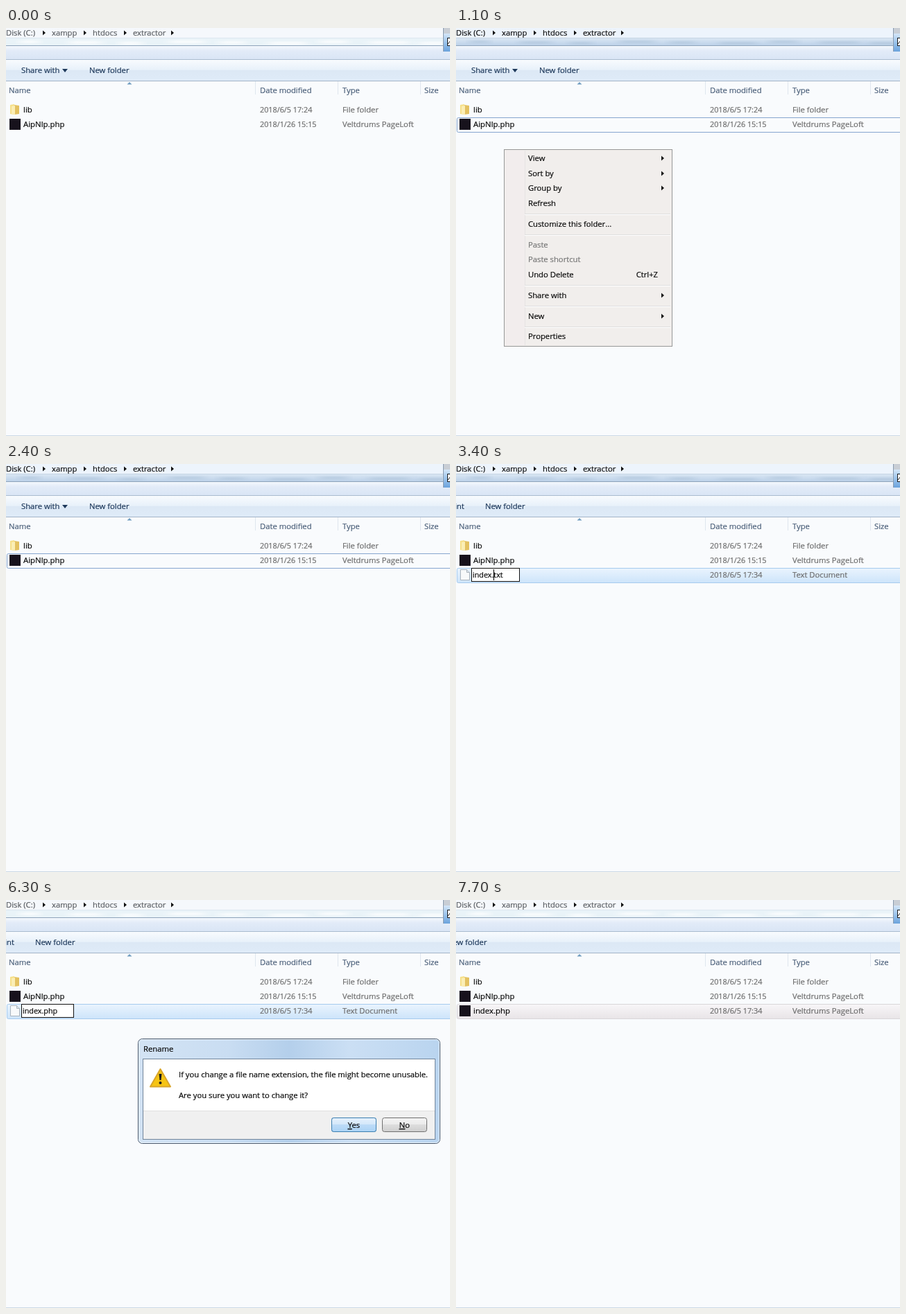
An HTML page that plays this animation: 640x589 px, repeating every 7800 ms.

```html
<!DOCTYPE html>
<html lang="en">
<head>
<meta charset="utf-8">
<title>Renaming a new file</title>
<style>
html, body { margin: 0; width: 100%; height: 100%; overflow: hidden; background: #f9fbfd; }
svg { display: block; width: 640px; height: 589px; }
text {
  --ink: #0c0c0c;
  font: 11.25px "Open Sans", "Noto Sans", sans-serif;
  fill: var(--ink); stroke: var(--ink); stroke-width: .22px; white-space: pre;
}
.date, .edit { font-size: 10.8px; }
.name { font-size: 11.4px; }
.soft { --ink: #6d6d6d; }
.head { --ink: #4c607a; }
.bar { --ink: #1e395b; }
.off { --ink: #777; }
.marked { fill: #fff; stroke: #fff; }
</style>
</head>
<body>
<svg id="stage" viewBox="0 0 640 589" xmlns="http://www.w3.org/2000/svg">
  <defs>
    <linearGradient id="strip" x2="0" y2="1">
      <stop offset="0" stop-color="#f4f8fd"/><stop offset=".35" stop-color="#e2ebf8"/><stop offset="1" stop-color="#d9e5f5"/>
    </linearGradient>
    <linearGradient id="tools" x2="0" y2="1">
      <stop offset="0" stop-color="#f8fbfe"/><stop offset=".48" stop-color="#e8f1fa"/>
      <stop offset=".5" stop-color="#dce8f5"/><stop offset="1" stop-color="#dfebf8"/>
    </linearGradient>
    <linearGradient id="sheen" x2="0" y2="1">
      <stop offset="0" stop-color="#d9e6f3"/><stop offset="1" stop-color="#bdd2e9"/>
    </linearGradient>
    <linearGradient id="picked" x2="0" y2="1">
      <stop offset="0" stop-color="#eaf4fe"/><stop offset="1" stop-color="#cde4fa"/>
    </linearGradient>
    <linearGradient id="idle" x2="0" y2="1">
      <stop offset="0" stop-color="#f8f6f8"/><stop offset="1" stop-color="#e8e4e7"/>
    </linearGradient>
    <linearGradient id="glass">
      <stop offset="0" stop-color="#d3e3f4"/><stop offset=".3" stop-color="#c9ddf2"/><stop offset=".5" stop-color="#b4cfeb"/>
      <stop offset=".7" stop-color="#cbdff4"/><stop offset="1" stop-color="#b9d4ef"/>
    </linearGradient>
    <linearGradient id="button" x2="0" y2="1">
      <stop offset="0" stop-color="#f3f3f3"/><stop offset=".48" stop-color="#ebebeb"/>
      <stop offset=".5" stop-color="#dddddd"/><stop offset="1" stop-color="#cfcfcf"/>
    </linearGradient>
    <linearGradient id="lit" x2="0" y2="1">
      <stop offset="0" stop-color="#e6f1fc"/><stop offset=".48" stop-color="#d3e7fa"/>
      <stop offset=".5" stop-color="#bddbf7"/><stop offset="1" stop-color="#abd3f5"/>
    </linearGradient>
    <linearGradient id="corner" x2="0" y2="1">
      <stop offset="0" stop-color="#d4e6f8"/><stop offset=".5" stop-color="#9cc4ec"/><stop offset="1" stop-color="#6ba3dc"/>
    </linearGradient>
    <filter id="blur" x="-20%" y="-80%" width="140%" height="260%"><feGaussianBlur stdDeviation="7 1.5"/></filter>
    <clipPath id="band"><rect y="15" width="629" height="10"/></clipPath>
  </defs>
</svg>
<script>
const LOOP = 7800, STEP = 100;
const stage = document.getElementById('stage');
const NS = stage.namespaceURI;

function add(tag, attrs, parent = stage, content = '') {
  const node = document.createElementNS(NS, tag);
  for (const key in attrs) node.setAttribute(key, attrs[key]);
  node.textContent = content;
  return parent.appendChild(node);
}
const group = (parent = stage) => add('g', {}, parent);
const rect = (x, y, width, height, fill, parent, more) =>
  add('rect', { x, y, width, height, fill, ...more }, parent);
const frame = (x, y, w, h, fill, stroke, parent, rx = 0) =>
  rect(x + .5, y + .5, w - 1, h - 1, fill, parent, { stroke, rx });
const label = (x, y, content, cls, parent) => add('text', { x, y, class: cls || '' }, parent, content);
const path = (d, fill, parent, more) => add('path', { d, fill, ...more }, parent);
const arrow = (x, y, parent) => path(`M${x} ${y - 3.5}l4 3.5l-4 3.5z`, '#111', parent);
const show = (node, alpha) => {
  node.style.display = alpha > 0 ? '' : 'none';
  node.style.opacity = Number(alpha);
};

// Address bar
rect(0, 0, 640, 589, '#f9fbfd');
const pale = group(), vivid = group();
rect(0, 0, 630, 15, '#f5f8fc', pale);
rect(0, 15, 630, 10, '#e9f3f8', pale);
rect(0, 0, 630, 15, '#edf4fc', vivid);
rect(0, 15, 630, 10, 'url(#sheen)', vivid);
for (const [parent, color] of [[pale, '#ffffff'], [vivid, '#b3c8de']]) {
  const streaks = add('g', { 'clip-path': 'url(#band)' }, parent);
  for (let i = 0; i < 9; i++)
    rect(20 + i * 72, 18 + i % 3, 28 + i * 17 % 30, 4, color, streaks, { filter: 'url(#blur)', opacity: .8 });
}
rect(0, 14, 630, 1, '#dde7f0', pale);
rect(0, 14, 630, 1, '#c6d5e4', vivid);
rect(0, 25, 640, 1, '#8da3ba');
rect(0, 26, 640, 20, 'url(#strip)');
const crumbs = [[0, 'Disk (C:)'], [66, 'xampp'], [125, 'htdocs'], [183, 'extractor']]
  .map(([x, name]) => label(x, 11, name));
for (const x of [53, 112, 170, 238]) arrow(x, 7);
rect(630, 0, 10, 8, '#c9ced5');
rect(630, 8, 10, 26, 'url(#corner)');
rect(630, 0, 1, 34, '#8799ad');
frame(636, 14, 9, 12, '#fff', '#1a1a1a');
path('M637 23l4-5', 'none', stage, { stroke: '#1a1a1a' });

// Toolbar
rect(0, 45, 640, 1, '#a9bbcf');
rect(0, 46, 640, 30, 'url(#tools)');
rect(0, 76, 640, 1, '#a3b4c8');
const share = group(), print = group();
label(22, 65, 'Share with', 'bar', share);
path('M81 59h8l-4 5z', '#1e395b', share);
label(12, 65, 'Print', 'bar', print).setAttribute('text-anchor', 'end');
const newFolder = label(120, 65, 'New folder', 'bar');

// Column headers
const headHover = rect(1, 77, 358, 24, '#e3f1fc');
for (const x of [359, 478, 597]) rect(x, 77, 1, 19, '#dfe6ee');
path('M174.5 81.5l3.5-3.5l3.5 3.5z', '#6e9cc0');
[[4, 'Name'], [366, 'Date modified'], [485, 'Type'], [603, 'Size']].forEach(([x, s]) => label(x, 94, s, 'head'));
rect(0, 588, 640, 1, '#cbd8e6');

// File list
const rowBox = (y, fill, stroke) => frame(1, y, 650, 22, fill, stroke, stage, 2);
const libHover = rowBox(108, '#eef6fe', '#cfe3f6');
const fileHover = rowBox(129, '#eef6fe', '#cfe3f6');
const focusBox = rowBox(129, 'none', '#86a6cf');
const activeRow = rowBox(150, 'url(#picked)', '#a6cbee');
const idleRow = rowBox(150, 'url(#idle)', '#d9d6d9');

path('M12 111l7 1v12l-7 1z', '#e3c161');
path('M6 111l6-1v15l-6-1z', '#f6e08a');
path('M8 113l5-1v13l-5-1z', '#fbeeb4');
const appIcon = (y, parent) => rect(5, y, 16, 16, '#17121c', parent);
appIcon(131);

const TOOL = 'Veltdrums PageLoft';
function fileInfo(y, date, type, parent) {
  label(366, y, date, 'soft date', parent);
  return label(485, y, type, 'soft', parent);
}
label(25, 122, 'lib', 'name');
fileInfo(122, '2018/6/5 17:24', 'File folder');
label(25, 143, 'AipNlp.php', 'name');
fileInfo(143, '2018/1/26 15:15', TOOL);

const newFile = group();
const newType = fileInfo(164, '2018/6/5 17:34', 'Text Document', newFile);
const page = group(newFile), pageIcon = group(newFile);
path('M6.5 152.5h9l4 4v11h-13z', '#f7f9fa', page, { stroke: '#aab4bd' });
path('M15.5 152.5v4h4', '#dde4ea', page, { stroke: '#aab4bd' });
appIcon(152, pageIcon);
const finalName = label(25, 164, 'index.php', 'name', newFile);

const editor = group(newFile);
const editBox = frame(22, 150, 70, 20, '#fff', '#111', editor);
const marked = rect(24, 152, 0, 16, '#3399ff', editor);
const editText = label(24, 164, '', 'edit', editor);
const [beforeMark, inMark, afterMark] = ['', 'marked', ''].map(cls => add('tspan', { class: cls }, editText));
const caret = rect(54, 152, 1, 16, '#000', editor);

// Menus
const hoverBar = (x, y, w, parent) => frame(x, y, w, 22, '#e1ecf8', '#aecff7', parent, 3);
function panel(x, y, w, h) {
  const g = group();
  frame(x, y, w, h, '#f1eeec', '#979797', g);
  rect(x + 2, y + 2, 28, h - 4, '#f2eded', g);
  rect(x + 30, y + 2, 1, h - 4, '#e5e3e3', g);
  return g;
}
const divider = (x, y, w, parent) => {
  rect(x, y, w, 1, '#dedede', parent);
  rect(x, y + 1, w, 1, '#fff', parent);
};

const menu = panel(69, 175, 243, 285);
const menuHover = hoverBar(72, 405, 237, menu);
for (const y of [268, 298, 371, 401, 431]) divider(99, y, 210, menu);
[['View', 192, 1], ['Sort by', 214, 1], ['Group by', 235, 1], ['Refresh', 257], ['Customize this folder...', 287],
 ['Paste', 317, 0, 'off'], ['Paste shortcut', 338, 0, 'off'], ['Undo Delete', 360], ['Share with', 390, 1],
 ['New', 420, 1], ['Properties', 449]].forEach(([name, y, more, cls]) => {
  label(104, y, name, cls, menu);
  if (more) arrow(296, y - 4, menu);
});
label(291, 360, 'Ctrl+Z', '', menu).setAttribute('text-anchor', 'end');

const submenu = panel(305, 153, 252, 277);
const subHover = hoverBar(308, 405, 246, submenu);
divider(335, 202, 219, submenu);
const kinds = ['Folder', 'Shortcut', 'Database File', 'Bitmap image', 'Contact', 'Rich Text Document',
  'Presentation', 'Publication Document', 'Text Document', 'Worksheet', 'Compressed (zipped) Folder', 'Briefcase'];
kinds.forEach((name, i) => {
  const y = (i < 2 ? 156 : 163) + i * 22;
  label(340, y + 15, name, '', submenu);
  if (i === 0 || i === 10) rect(314, y + 4, 14, 13, '#f0d272', submenu, { rx: 1 });
  else frame(315, y + 3, 12, 15, '#fafcfe', '#9dabb9', submenu);
});

// Confirmation dialog
const dialog = group();
frame(190, 200, 436, 152, 'url(#glass)', '#46566a', dialog, 6);
frame(191, 201, 434, 150, 'none', '#eef6fd', dialog, 5);
label(198, 219, 'Rename', '', dialog);
frame(197, 229, 422, 117, '#fff', '#71859b', dialog);
rect(198, 304, 420, 41, '#f0f0f0', dialog);
rect(198, 304, 420, 1, '#dfdfdf', dialog);
path('M222.5 244L237 269.5H208z', '#f6c414', dialog, { stroke: '#d9a52a', 'stroke-width': 2, 'stroke-linejoin': 'round' });
path('M220.5 251h4l-1 9h-2z', '#1d1d1d', dialog);
add('circle', { cx: 222.5, cy: 264, r: 2, fill: '#1d1d1d' }, dialog);
label(249, 256, 'If you change a file name extension, the file might become unusable.', '', dialog);
label(249, 286, 'Are you sure you want to change it?', '', dialog);
frame(469, 314, 65, 21, 'url(#button)', '#3c7fb1', dialog, 3);
frame(470, 315, 63, 19, 'none', '#46cdf2', dialog, 2);
const yesLit = frame(469, 314, 65, 21, 'url(#lit)', '#3c7fb1', dialog, 3);
frame(542, 314, 65, 21, 'url(#button)', '#707070', dialog, 3);
function caption(x, key, rest) {
  const text = add('text', { x, y: 329, 'text-anchor': 'middle' }, dialog);
  add('tspan', { 'text-decoration': 'underline' }, text, key);
  add('tspan', {}, text, rest);
}
caption(501.5, 'Y', 'es');
caption(574.5, 'N', 'o');

// Name being edited: text, selection start, selection end
function editState(t) {
  if (t < 2800) return ['New Text Document.txt', 0, 17];
  if (t < 3400) {
    const n = Math.min(5, (t - 2700) / STEP);
    return ['index'.slice(0, n) + '.txt', n, n];
  }
  if (t < 4300) return ['index.txt', 6, 6 + Math.max(0, Math.min(3, (t - 3600) / STEP))];
  const n = Math.min(3, (t - 4200) / STEP);
  return ['index.' + 'php'.slice(0, n), 6 + n, 6 + n];
}

function drawEditor(t) {
  const [name, from, to] = editState(t);
  beforeMark.textContent = name.slice(0, from);
  inMark.textContent = name.slice(from, to);
  afterMark.textContent = name.slice(to);
  const widthTo = n => n ? editText.getSubStringLength(0, n) : 0;
  const left = widthTo(from), right = widthTo(to);
  editBox.setAttribute('width', Math.round(widthTo(name.length)) + 25);
  marked.setAttribute('x', 24 + left);
  marked.setAttribute('width', right - left);
  caret.setAttribute('x', Math.round(23.5 + left));
  show(caret, from === to && t < 4600);
}

const within = (t, a, b) => t >= a && t < b;
const ramp = (t, a, b) => Math.max(0, Math.min(1, (t - a) / (b - a)));

function render(time) {
  const t = Math.floor(time % LOOP / STEP) * STEP;
  const active = within(t, 800, 4900) || within(t, 6400, 7700);
  const renamed = t >= 6500;
  show(pale, !active);
  show(vivid, active);
  crumbs.forEach(c => c.style.setProperty('--ink', active ? '#111' : '#5c5f63'));

  show(headHover, within(t, 100, 200));
  show(libHover, within(t, 200, 300));
  show(fileHover, within(t, 300, 400) ? .6 : 0);
  show(focusBox, within(t, 800, 2600));

  show(menu, within(t, 800, 2400) ? ramp(t, 700, 1000) : 0);
  show(menuHover, t >= 1200);
  menuHover.setAttribute('y', t < 1300 ? 375.5 : 405.5);
  show(submenu, within(t, 1400, 2400) ? ramp(t, 1300, 1500) : 0);
  show(subHover, t >= 1900);
  subHover.setAttribute('y', 405.5 - 22 * Math.min(3, (t - 1900) / STEP));

  show(share, t < 2600);
  show(print, t >= 2600 && !renamed);
  newFolder.setAttribute('x', t < 2600 ? 120 : renamed ? -13 : 42);

  show(newFile, t >= 2600);
  show(activeRow, within(t, 2600, 7700));
  show(idleRow, t >= 7700);
  show(page, t < 6600);
  show(pageIcon, t >= 6600);
  show(editor, !renamed);
  show(finalName, renamed);
  newType.textContent = renamed ? TOOL : 'Text Document';
  if (within(t, 2600, 6500)) drawEditor(t);

  show(dialog, within(t, 4900, 6400) ? 1 : within(t, 6400, 6500) ? .4 : 0);
  show(yesLit, ramp(t, 5700, 6200));
}

const start = performance.now();
function tick() {
  render(performance.now() - start);
  requestAnimationFrame(tick);
}
tick();
</script>
</body>
</html>
```
